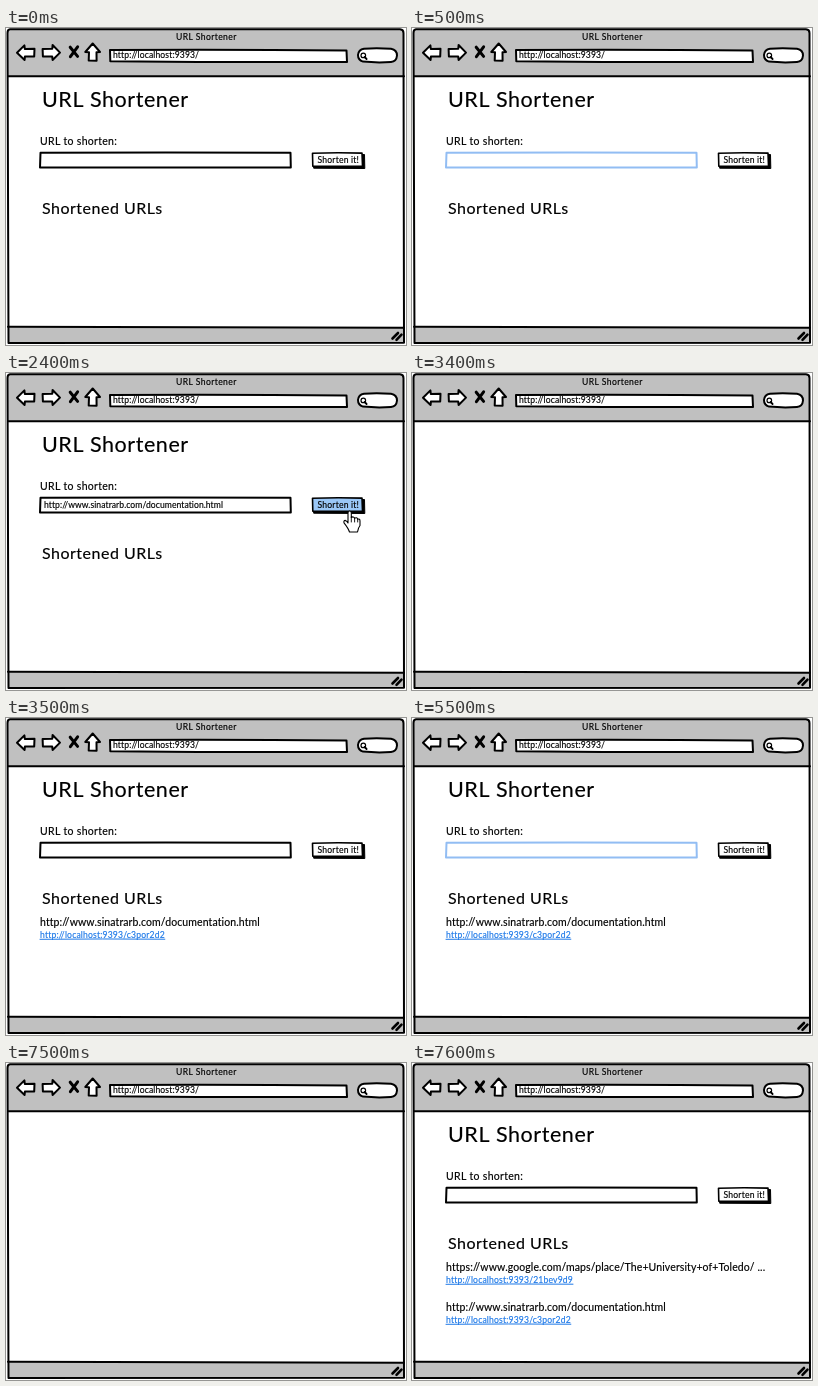
An HTML page with a canvas that plays this animation: 400x317 px, repeating every 8 s.

```html
<!DOCTYPE html>
<html lang="en">
<head>
<meta charset="utf-8">
<title>URL Shortener</title>
<style>
html, body { margin: 0; width: 100%; height: 100%; overflow: hidden; background: #fff; }
canvas { display: block; width: 400px; height: 317px; }
</style>
</head>
<body>
<canvas id="stage"></canvas>
<script>
const W = 400, H = 317, LOOP = 8000;
const INK = '#000', GREY = '#c0c0c0', FOCUS = '#92bdf3', HOT = '#9ac7f7', LINK = '#1c78e8';
const DOC = 'http://www.sinatrarb.com/documentation.html';
const MAP = 'https://www.google.com/maps/place/The+University+of+Tole';
const HOST = 'http://localhost:9393/';

const canvas = document.getElementById('stage');
const ctx = canvas.getContext('2d');
const dpr = window.devicePixelRatio || 1;
canvas.width = W * dpr;
canvas.height = H * dpr;

function text(str, x, y, size, spacing, color = INK) {
  ctx.font = `400 ${size}px Lato, "Open Sans", sans-serif`;
  ctx.letterSpacing = spacing + 'px';
  ctx.fillStyle = ctx.strokeStyle = color;
  ctx.lineWidth = 0.15;
  ctx.fillText(str, x, y);
  ctx.strokeText(str, x, y);
  return ctx.measureText(str).width;
}

function shape(d, fill, stroke = INK, width = 2) {
  const path = new Path2D(d);
  if (fill) {
    ctx.fillStyle = fill;
    ctx.fill(path);
  }
  if (stroke) {
    ctx.strokeStyle = stroke;
    ctx.lineWidth = width;
    ctx.stroke(path);
  }
}

function link(code, y) {
  const w = text(HOST + code, 34, y, 8.6, 0.17, LINK);
  shape(`M34 ${y + 1.8}Q${34 + w / 2} ${y + 1.2} ${34 + w} ${y + 1.7}`, null, LINK, 1);
}

function chrome() {
  const frame = 'M4 1.3L394 1.3Q397.5 1.6 397.5 5L398 314.7Q200 315.6 2.5 315L1.5 5Q1.5 1.5 4 1.3Z';
  shape(frame, GREY, null);
  shape('M2 48.3L398 48.3V299.3H2Z', '#fff', null);
  shape(frame);
  shape('M2 48.3L398 48.3M2 298.8L398 299.8');

  // Back, forward, stop, home
  shape('M11 24.7L18.4 17.4L18.8 21L28.5 20.8L28.2 28.4L18.9 28.6L18.6 32Z', '#fff');
  shape('M54 24.6L46.6 17L46.3 20.7L36.6 20.9L36.9 28.5L46.2 28.4L46.6 32Z', '#fff');
  shape('M64.2 19.2L71.6 28.4M71.6 18.8L64.4 28.7', null, INK, 3);
  shape('M86.7 15.5L94 24L90.5 24.3L90.6 32.8L82.7 32.6L83 24.2L79.3 24Z', '#fff');

  shape('M104 22Q220 21.2 340.5 22.5L341 34Q220 34.4 104.3 33.2Z', '#fff');
  shape('M358 20.7Q371 19.6 385 20.8Q391 22 391 27.5Q390.5 33.5 385 34Q371 35 357 33.6Q352 32 352 27Q352.5 21.5 358 20.7Z', '#fff');
  shape('M359.6 27.4A2.3 2.3 0 1 1 355 27.4A2.3 2.3 0 1 1 359.6 27.4', null, INK, 1.2);
  shape('M358.6 29L360.6 31', null, INK, 1.8);
  shape('M386.5 310.5L392 305M390.5 311.8L395.5 306.6', null, INK, 2.6);

  text('URL Shortener', 170, 12, 8.6, 0.38);
  text(HOST, 107, 30.3, 8.6, 0.12);
}

function hand() {
  shape('M342 150V140Q342 138 343.5 138Q345.3 138 345.3 140V144.5Q347.5 143 348.6 145.2' +
    'Q350.8 144 351.7 146.2Q354 145.4 354 148V152.5Q352 155 351.5 159H343.5Q342.5 155.5 338 149.8' +
    'Q337.4 147.4 339.4 147.4Q341 148 342 150Z', '#fff', INK, 1.1);
  shape('M345.3 144V149M348.6 145V149M351.7 146V149', null, INK, 0.9);
}

function form(value, focused, pressed) {
  shape('M34.5 124.8Q160 124.2 284.5 124.8L284.8 139.4Q160 139 34 139.6Z', '#fff', focused ? FOCUS : INK);
  text(value, 38, 134.8, 8.6, 0.06);
  shape('M308 127L358.5 126.5L358.8 140.5L308 140.2Z', INK, INK, 1);
  shape('M306.5 125.2Q330 124.4 356 125.1L356.5 138Q330 138.6 306.8 138.2Z', pressed ? HOT : '#fff', INK, 1.6);
  text('Shorten it!', 311.5, 134.7, 8.6, 0.2);
}

function results(count) {
  let y = 208;
  if (count > 1) {
    text(MAP + 'do/ ...', 34, y, 10.5, 0.1);
    link('21bev9d9', y + 11.5);
    y += 40;
  }
  if (count > 0) {
    text(DOC, 34, y, 10.5, 0.1);
    link('c3por2d2', y + 11.5);
  }
}

function typed(t) {
  if (t < 1000) return '';
  if (t < 1200) return 'http://';
  if (t < 1400) return 'http://www.sinatrarb.com/';
  if (t < 3400) return DOC;
  return t >= 6000 && t < 7500 ? MAP : '';
}

function draw(t) {
  const between = (a, b) => t >= a && t < b;
  ctx.setTransform(dpr, 0, 0, dpr, 0, 0);
  ctx.fillStyle = '#fff';
  ctx.fillRect(0, 0, W, H);
  ctx.lineJoin = ctx.lineCap = 'round';
  chrome();
  if (between(3400, 3500) || between(7500, 7600)) return;

  const focused = between(500, 2400) || between(5500, 6500);
  const pressed = between(2400, 3400) || between(6500, 7500);
  text('URL Shortener', 36, 79, 21.5, 0.55);
  text('URL to shorten:', 34, 117, 10.5, 0.3);
  text('Shortened URLs', 36, 186.3, 16, 0.5);
  form(typed(t), focused, pressed);
  results(t >= 7600 ? 2 : t >= 3500 ? 1 : 0);
  if (pressed) hand();
}

const start = performance.now();
function tick() {
  draw((performance.now() - start) % LOOP);
  requestAnimationFrame(tick);
}
tick();
</script>
</body>
</html>
```
